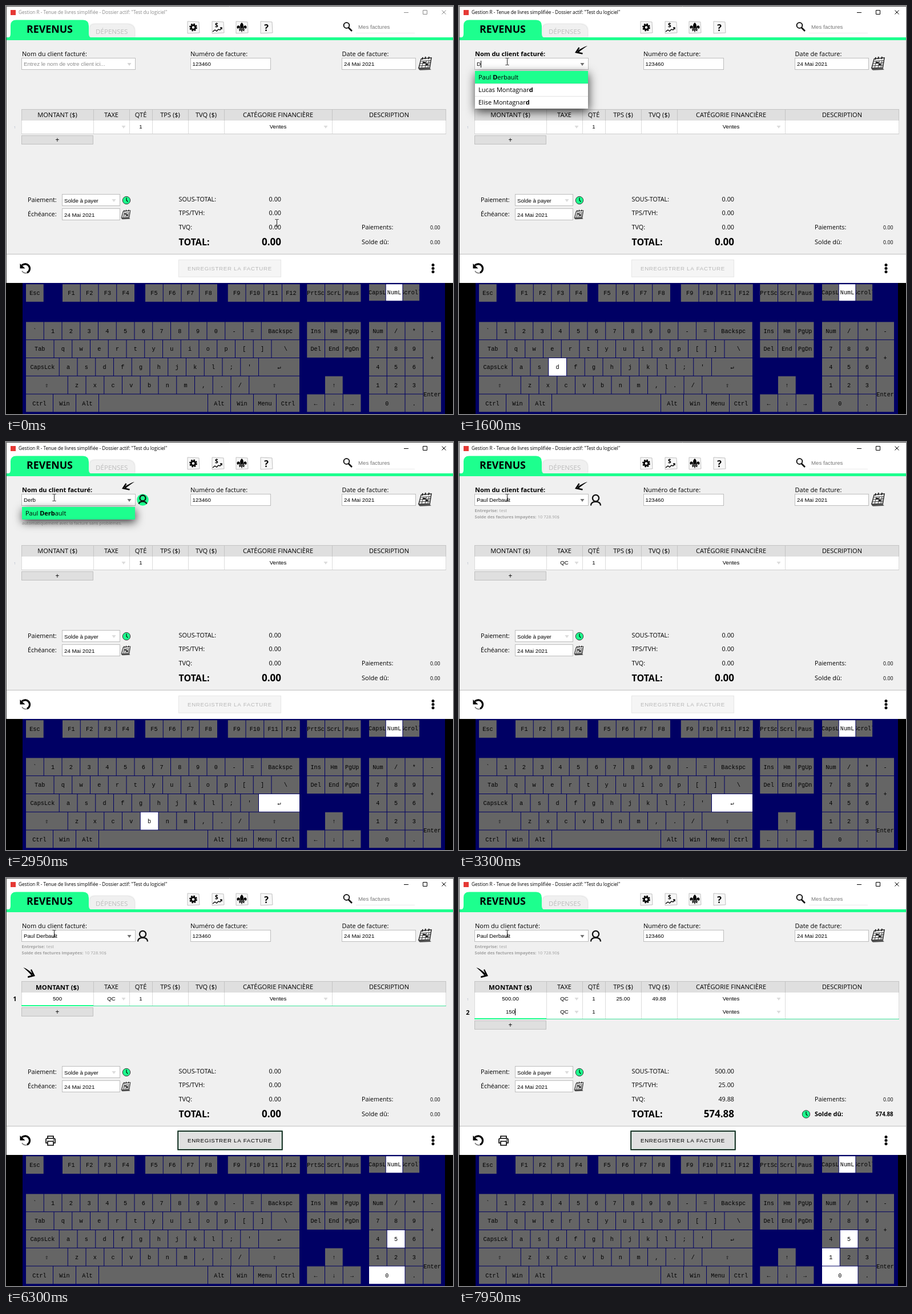
These frames come from a looping animation (783 by 716 pixels, 8 s). An HTML page with a canvas:

```html
<!DOCTYPE html>
<html lang="fr">
<head>
<meta charset="utf-8">
<title>Facture</title>
<style>
html, body { margin: 0; width: 100%; height: 100%; overflow: hidden; background: #000 }
canvas { display: block }
</style>
</head>
<body>
<canvas id="stage" width="783" height="716"></canvas>
<script>
const c = document.getElementById('stage').getContext('2d', { alpha: false });
const UI = '"Open Sans", "Noto Sans", sans-serif';
const ARIAL = '"Liberation Sans", Arial, sans-serif';
const MONO = '"Liberation Mono", "DejaVu Sans Mono", monospace';
const GREEN = '#1dff8e', LOOP = 8000, HOLD = 1040, BLINK = 530, KEY = 31.75;
const CLIENT = 1, ROW1 = 2, ROW2 = 3;

// time, key, focused field, typed text
const events = [
  [0, '', 0, ''], [850, '', CLIENT, ''],
  [1600, 'd', CLIENT, 'D'], [1760, 'e', CLIENT, 'De'], [1900, 'r', CLIENT, 'Der'], [2250, 'b', CLIENT, 'Derb'],
  [2950, '↵', 0, ''], [4355, '↵', ROW1, ''],
  [5350, 'p5', ROW1, '5'], [5650, 'p0', ROW1, '50'], [5760, 'p0', ROW1, '500'],
  [6660, '+', ROW2, ''], [7600, 'p1', ROW2, '1'], [7750, 'p5', ROW2, '15'], [7950, 'p0', ROW2, '150']
];
const cols = [27, 153, 216, 256, 319, 382, 571, 771];
const heads = ['MONTANT ($)', 'TAXE', 'QTÉ', 'TPS ($)', 'TVQ ($)', 'CATÉGORIE FINANCIÈRE', 'DESCRIPTION'];
let t = 0;

const ramp = (a, b) => Math.min(1, Math.max(0, (t - a) / (b - a)));

function text(s, x, y, size, { font = UI, bold, color = '#000', align = 'left' } = {}) {
  c.font = `${bold ? 'bold ' : ''}${size}px ${font}`;
  c.fillStyle = color;
  c.textAlign = align;
  c.fillText(s, x, y + size * .36);
  return c.measureText(s).width;
}
const arial = (s, x, y, o) => text(s, x, y, 9.7, { font: ARIAL, ...o });
const mid = { align: 'center' };

function box(x, y, w, h, fill, border) {
  c.fillStyle = fill;
  c.fillRect(x, y, w, h);
  if (!border) return;
  c.strokeStyle = border;
  c.lineWidth = 1;
  c.strokeRect(x + .5, y + .5, w - 1, h - 1);
}
function path(d, width, color = '#000') {
  const p = new Path2D(d);
  if (width) {
    c.lineWidth = width;
    c.strokeStyle = color;
    c.stroke(p);
  } else {
    c.fillStyle = color;
    c.fill(p);
  }
}
function disc(x, y, r, fill, line, width = 1) {
  c.beginPath();
  c.arc(x, y, r, 0, 7);
  if (fill) { c.fillStyle = fill; c.fill(); }
  if (line) { c.lineWidth = width; c.strokeStyle = line; c.stroke(); }
}
function at(x, y, sx, sy, draw) {
  c.save();
  c.translate(x, y);
  c.scale(sx, sy);
  draw();
  c.restore();
}
const chevron = (x, y, color = '#dcdcdc') => path(`M${x - 3.5} ${y - 2}h7l-3.5 5z`, 0, color);
const input = (x, y, w) => box(x, y, w, 21, '#fff', '#bdbdbd');
const caret = (x, y) => box(Math.round(x), y - 6, 1, 12, '#000');

function clock(x, y) {
  disc(x, y, 6.7, GREEN, '#333');
  path(`M${x} ${y - 4.5}v4.5l2.5 2.5`, 1.2);
}
function calendar(x, y, s) {
  at(x, y, s, s, () => {
    path('M-7 -9L12 -11L9 9L11 11L-9 12L-12 8Z', 0, '#777');
    path('M-7 -8L11 -10L8 7L-11 8Z', 0, '#f0f0f0');
    path('M-7 -8L11 -10L8 7L-11 8ZM-11 10L9 9.5', 1.2, '#222');
    path('M-8 -4L10 -5.5M-9 0L9 -1.5M-10 4L8.5 3M-3 -4.5L-6 8M2.5 -5L0 7.5M7 -5L5 7', 1, '#444');
    path('M-4 -3h5v3h-5zM1 0h4v3h-4z', 0, '#222');
    path('M-4 -11l-1 4M1 -12l-1 4M7 -12l-1 4', 2, '#222');
  });
}
const pointer = (x, y, sx, sy) => at(x, y, sx, sy, () => {
  path('M21 -12C16 -11 9 -7 3 -3L5 0C10 -5 15 -8 21 -12Z');
  path('M6.5 -9L1 -.8L12.5 1.5', 2.4);
});
function person(lit) {
  if (lit) disc(239.5, 101.5, 10.3, GREEN);
  disc(239.5, 98.5, lit ? 5 : 5.6, '', '#111', 2.3);
  path(lit ? 'M232.5 108.5C234 104.5 237 104.3 239.5 104.3S245 104.5 246.5 108.5'
    : 'M231 111.5C231 106 235 104.8 239.5 104.8S248 106 248 111.5', 2.3, '#111');
}

function keyRow(x, y, keys, { h = KEY, w = KEY, pad = '' } = {}) {
  for (const spec of keys.split(' ')) {
    const [label, own] = spec.split(':');
    const kw = +own || w;
    const id = /\d/.test(label) ? pad + label : label;
    const lit = label === 'NumL' || events.some(e => e[1] && e[1] === id && t >= e[0] && t - e[0] < HOLD);
    c.save();
    c.beginPath();
    c.rect(x, y, kw - 1, h - 1);
    c.clip();
    c.fillStyle = lit ? '#fff' : '#656565';
    c.fillRect(x - 1, y - 1, kw + 1, h + 1);
    text(label, x + (kw - 1) / 2, y + (h - 1) / 2, 10.2, { font: MONO, align: 'center' });
    c.restore();
    x += kw;
  }
}
function keyboard() {
  const [y0, y1, y2, y3, y4] = [0, 1, 2, 3, 4].map(i => 554.5 + KEY * i);
  box(29, 486, 740, 230, '#000064');
  keyRow(35, 488.25, 'Esc');
  keyRow(99, 488.25, 'F1 F2 F3 F4');
  keyRow(244, 488.25, 'F5 F6 F7 F8');
  keyRow(388.75, 488.25, 'F9 F10 F11 F12');
  keyRow(527.25, 488.25, 'PrtSc ScrL Paus');
  keyRow(636, 488.25, 'CapsL NumL Scroll', { w: 29.7, h: 30 });
  keyRow(35, y0, '` 1 2 3 4 5 6 7 8 9 0 - = Backspc:67');
  keyRow(35, y1, 'Tab:49.5 q w e r t y u i o p [ ] \\:49.5');
  keyRow(35, y2, "CapsLck:58.75 a s d f g h j k l ; ' ↵:72");
  keyRow(35, y3, '⇧:73.75 z x c v b n m , . / ⇧:88.75');
  keyRow(35, y4, 'Ctrl:48 Win:40 Alt:40 :191 Alt:40 Win:40 Menu:40 Ctrl:41');
  keyRow(527.25, y0, 'Ins Hm PgUp');
  keyRow(527.25, y1, 'Del End PgDn');
  keyRow(559, y3, '↑');
  keyRow(527.25, y4, '← ↓ →');
  const pad = { pad: 'p' };
  keyRow(636, y0, 'Num / * -', pad);
  keyRow(636, y1, '7 8 9', pad);
  keyRow(636, y2, '4 5 6', pad);
  keyRow(636, y3, '1 2 3', pad);
  keyRow(636, y4, '0:63.5 .', pad);
  keyRow(731.25, y1, '+', { h: 2 * KEY });
  keyRow(731.25, y3, 'Enter', { h: 2 * KEY });
}

function fleur() {
  path('M0 -8.5C4.5 -4 3 -1 1.4 2H-1.4C-3 -1 -4.5 -4 0 -8.5Z');
  for (const side of [1, -1]) at(0, 0, side, 1, () => {
    path('M2 2.2C2.5 -3.5 8 -5 8.5 -.5C8.5 2.5 6 3 5.5 1C4.5 .6 4 1.2 3.8 2.2Z');
    path('M1.5 4.5C2 6.5 3.5 7 5 6C4.5 5.5 4 5 3.8 4.5Z');
  });
  path('M-5 2.6h10v1.5h-10zM-1.4 4.5h2.8L0 9z');
}
function header() {
  const ink = t < 850 ? '#8a8a8a' : '#000';
  box(0, 0, 783, 486, '#f0f0f0');
  box(0, 0, 783, 55, '#fff');
  box(8, 7, 9, 9, '#e53935');
  text('Gestion R - Tenue de livres simplifiée - Dossier actif: "Test du logiciel"', 22, 11.5, 8.2, { color: ink });
  path('M697 11.5h8M730.5 7.5h7v7h-7zM763.5 7.5l7 7m0 -7l-7 7', 1, ink);

  c.save();
  c.shadowColor = '#bbb';
  c.shadowBlur = 3;
  path('M147 55V38Q148 32 155 32H214Q224 33 225 41V55Z', 0, '#f0f0f0');
  c.restore();
  text('DÉPENSES', 157, 45, 11.6, { color: '#bdbdbd' });
  box(0, 55, 783, 5, GREEN);
  path('M5 55Q8 54 8 48V34Q8 24.5 18 24.5H135Q145 24.5 145 35V48Q145 54 148 55Z', 0, GREEN);
  text('REVENUS', 36, 41, 17.8, { bold: true });

  [328, 371, 413, 456].forEach(x => {
    path(`M${x - 10} 27l20 1l1 19l-21 1z`, 0, '#f7f7f7');
    path(`M${x - 10} 27l20 1l1 19l-21 1z`, 1, '#c0c0c0');
  });
  disc(328, 37.5, 3.8, '', '#000', 3);
  c.setLineDash([2.4, 1.8]);
  disc(328, 37.5, 5.4, '', '#000', 3);
  c.setLineDash([]);
  text('$', 366, 33, 10, { bold: true });
  path('M362 45l4 -3l3 2l3 -3l3 1l3 -4m-3 0h3v3', 1.4);
  at(413, 37.5, 1, 1, fleur);
  text('?', 456, 38, 16, { bold: true, align: 'center' });
  disc(596.5, 34, 4.9, '', '#000', 1.8);
  path('M600 38l6 6', 2.6);
  arial('Mes factures', 617, 37, { color: '#777' });
  box(613, 47, 103, 1, '#ececec');
}

function topFields(focus, typed, blinkOn) {
  const inClient = t >= 850 && t < 4400, chosen = t >= 3000;
  text('Nom du client facturé:', 28, 84, 11, { bold: inClient });
  text('Numéro de facture:', 323, 84, 11);
  text('Date de facture:', 588.5, 84, 11);
  input(27, 91, 200);
  input(323, 91, 141);
  input(588, 91, 130);
  arial('123460', 326.5, 102);
  arial('24 Mai 2021', 592, 102);
  calendar(734, 101, 1);
  const shade = Math.round(212 - 100 * ramp(850, 1200));
  chevron(216, 102, `rgb(${shade},${shade},${shade})`);

  const value = chosen ? 'Paul Derbault' : t >= 2950 ? 'Derb' : focus === CLIENT ? typed : '';
  if (value) {
    const w = arial(value, 31, 102);
    if (focus === CLIENT && blinkOn) caret(31 + w, 102);
  } else {
    arial('Entrez le nom de votre client ici...', 31, 102, { color: '#8c8c8c' });
    if (focus === CLIENT && blinkOn) caret(31, 102);
  }

  if (inClient) {
    c.globalAlpha = ramp(800, 1200);
    pointer(204, 82, 1, 1);
    c.globalAlpha = 1;
  } else if (t >= 4400) pointer(50, 172, -.94, 1.25);

  if (t >= 1850) {
    c.globalAlpha = ramp(1800, 2000);
    person(t < 3100);
    c.globalAlpha = 1;
  }
  const grey = '#a0a0a0';
  if (chosen) {
    [['Entreprise:', 'test', 120], ['Solde des factures impayées:', '10 728.90$', 131]].forEach(([a, b, y]) => {
      const w = text(a, 27.5, y, 7.5, { bold: true, color: grey });
      text(b, 30 + w, y, 7.5, { color: grey });
    });
  } else if (t >= 2000) {
    text('automatiquement avec la facture sans problèmes.', 28, 142, 7.5, { color: grey });
  }
}

function suggestions() {
  if (t < 1600 || t >= 3000) return;
  const n = t < 1800 ? 1 : t < 1900 ? 2 : t < 2250 ? 3 : 4;
  const items = [['Paul ', 'Derbault'.slice(0, n), 'Derbault'.slice(n)]];
  if (n === 1) items.push(['Lucas Montagnar', 'd', ''], ['Elise Montagnar', 'd', '']);
  c.save();
  c.shadowColor = 'rgba(0,0,0,.75)';
  c.shadowBlur = 16;
  c.shadowOffsetX = 1;
  c.shadowOffsetY = 5;
  box(28, 114, 198, 22 * items.length, '#fff');
  c.restore();
  items.forEach((parts, i) => {
    const y = 114 + 22 * i;
    box(28, y, 198, 22, i ? '#fff' : GREEN);
    if (i) box(28, y, 198, 1, '#e4e4e4');
    let x = 34;
    parts.forEach((s, j) => x += text(s, x, y + 11, 11, { bold: j === 1 }));
  });
}

function rowNumber(n, y, k) {
  text(n, 15.5, y, 6 + 5 * k, { bold: k > .5, color: k ? '#000' : '#a9b2c6', align: 'center' });
}
function tableRow(y, cells, taxe) {
  box(27, y, 744, 23, '#fff');
  cols.forEach(x => box(Math.min(x, 770), y, 1, 23, '#dcdcdc'));
  box(27, y + 23, 744, 1, '#cfcfcf');
  cells.forEach((s, i) => arial(s, (cols[i] + cols[i + 1]) / 2, y + 11, mid));
  if (taxe) arial('QC', 184.5, y + 11, mid);
  chevron(206, y + 11);
  chevron(560, y + 11);
}
function underline(y, whole) {
  if (whole) box(27, y + 1, 744, 1, '#3fe39a');
  box(27, y, 126, 2, GREEN);
}
function table(focus, typed, blinkOn, billed) {
  box(27, 181, 744, 21, '#dfdfdf', '#c4c4c4');
  heads.forEach((s, i) => {
    if (i) box(cols[i], 181, 1, 20, '#c4c4c4');
    const bold = !i && t >= 4400;
    text(s, (cols[i] + cols[i + 1]) / 2, 191.5, bold ? 11.4 : 11.1, { bold, align: 'center' });
  });
  const first = focus === ROW1 ? typed : '';
  tableRow(201, billed ? ['500.00', '', '1', '25.00', '49.88', 'Ventes', ''] : [first, '', '1', '', '', 'Ventes', ''], t >= 3000);
  rowNumber('1', 212.5, ramp(4350, 4550) * (1 - ramp(6650, 6850)));
  if (billed) {
    tableRow(224, [focus === ROW2 ? typed : '', '', '1', '', '', 'Ventes', ''], true);
    rowNumber('2', 236, ramp(6650, 6850));
    underline(246, typed);
  } else if (t >= 4400) underline(223, true);
  if (focus >= ROW1 && blinkOn) {
    c.font = `9.7px ${ARIAL}`;
    caret(90 + c.measureText(typed).width / 2, focus === ROW1 ? 212 : 235);
  }
  const y = billed ? 250 : 227;
  box(27, y, 126, 16, '#dfdfdf', '#c0c0c0');
  text('+', 90, y + 8, 12, mid);
}

function totals(billed) {
  text('Paiement:', 38, 340, 10.8);
  text('Échéance:', 38, 365, 10.8);
  input(98, 330, 102);
  input(98, 355, 102);
  arial('Solde à payer', 102, 341.5);
  arial('24 Mai 2021', 102, 366.5);
  chevron(189, 341);
  clock(211, 341);
  calendar(210, 366, .7);

  const right = { align: 'right' };
  [['SOUS-TOTAL:', '500.00'], ['TPS/TVH:', '25.00'], ['TVQ:', '49.88']].forEach(([label, v], i) => {
    const y = 339 + 24.5 * i;
    text(label, 302.5, y, 10.8);
    text(billed ? v : '0.00', 482, y, 10.8, right);
  });
  const due = billed ? '574.88' : '0.00';
  text('TOTAL:', 302.5, 414, 16, { bold: true });
  text(due, 482, 414, 17, { bold: true, align: 'right' });
  text('Paiements:', 623, 388.5, 10.7);
  text('0.00', 760.5, 389, 8.8, right);
  text('Solde dû:', 623, 414, 11, { bold: billed });
  text(due, 760.5, 415, billed ? 9.7 : 8.8, { bold: billed, align: 'right' });
  if (billed) clock(608, 414.5);
}

function footer() {
  const ready = t >= 5650 && t < 6700 || t >= 7650;
  box(0, 435, 783, 51, '#fff');
  box(0, 435, 783, 1, '#c0c0c0');
  path('M28 455A8 8 0 1 1 37 468', 3.2);
  path('M37 468.2A8 8 0 0 1 28 465', 1.5, '#777');
  path('M24.5 452v8.5h9z');
  [454.5, 460.5, 466.5].forEach(y => disc(748, y, 2.5, '#000'));
  if (ready) {
    path('M73 457v-4h10v4M73 465h-3v-6q0 -2 2 -2h12q2 0 2 2v6h-3M73 462h10v7h-10z', 1.6);
    disc(83.5, 459.5, .9, '#000');
    box(300, 443, 185, 35, '#8fdcb6');
    box(300.5, 443.5, 184, 34, '#000');
    box(302, 445, 181, 31, '#8fdcb6');
    box(302.5, 445.5, 180, 30, '#e0e0e0');
  } else box(302, 445, 180, 31, '#f5f5f5', '#e6e6e6');
  c.letterSpacing = '0.7px';
  arial('ENREGISTRER LA FACTURE', 318, 460.5, { color: ready ? '#000' : '#b8b8b8' });
  c.letterSpacing = '0px';
}

function mouse() {
  const k = ramp(0, 600), e = k * k * (3 - 2 * k);
  const x = Math.round(474 - 390 * e), y = Math.round(380 - 283 * e);
  path(`M${x - 2.5} ${y - 5.5}h2q1 0 1 1q0 -1 1 -1h2M${x + .5} ${y - 5}v11M${x - 2.5} ${y + 6.5}h2q1 0 1 -1q0 1 1 1h2`, 1, '#222');
}

const start = performance.now();
function frame() {
  t = Math.floor((performance.now() - start) % LOOP / 50) * 50;
  const [time, , focus, typed] = events.filter(e => e[0] <= t).pop();
  const blinkOn = (t - time) % (2 * BLINK) < BLINK, billed = t >= 6700;
  box(0, 0, 783, 716, '#000');
  keyboard();
  header();
  topFields(focus, typed, blinkOn);
  table(focus, typed, blinkOn, billed);
  suggestions();
  totals(billed);
  footer();
  path('M.5 486V.5H783', 1, '#444');
  mouse();
  requestAnimationFrame(frame);
}
frame();
</script>
</body>
</html>
```
